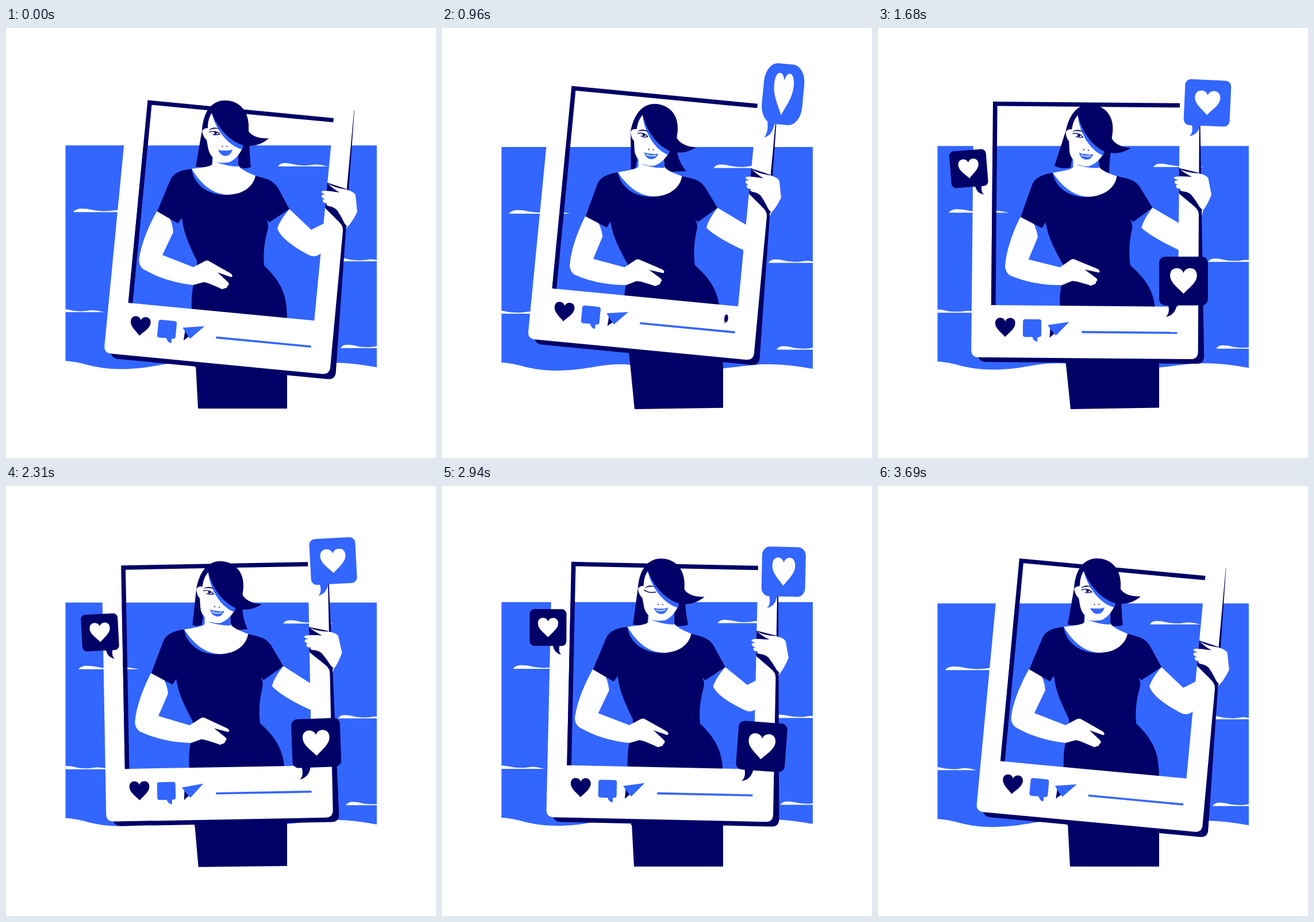
Animation of 748x748 px, one loop 3.72 s. Source, as an HTML page:

```html
<!DOCTYPE html>
<html lang="en">
<head>
<meta charset="utf-8">
<title>Photo frame</title>
<style>
  html, body { margin: 0; width: 100%; height: 100%; overflow: hidden; background: #fff; }
  svg { display: block; width: 100vw; height: 100vh; }
  .n { fill: #006; }
  .b { fill: #36f; }
  .w { fill: #fff; }
  .line { fill: none; stroke: #006; stroke-width: 1.4; stroke-linecap: round; }
</style>
</head>
<body>
<svg viewBox="0 0 748 748">
  <defs>
    <path id="heart" d="M0 21C-8 12-22 3-22-9C-22-18-16-21-11-21C-5-21-1-17 0-13C1-17 5-21 11-21C16-21 22-18 22-9C22 3 8 12 0 21Z"/>
    <path id="ripple" d="M0 0C4-7 14-7 28-3.6C40-1 52-1.2 62-3C72-4.5 80-1 88 0Z"/>
    <path id="tail" d="M4-40V-19Q7-6 0 0Q15-3 18-19V-40Z"/>
    <clipPath id="stage"><rect x="103.500" y="0" width="541.500" height="748"/></clipPath>
  </defs>

  <g clip-path="url(#stage)">
    <g id="sea">
      <path class="b" d="M103 204H646V590C625 587 605 582 565 582C530 582 500 591 450 591S350 582 310 582C270 582 250 593 200 593S135 580 103 579Z"/>
      <g id="ripples" class="w">
        <use href="#ripple" transform="translate(473 240.500)"/>
        <use href="#ripple" transform="translate(117 320) scale(1.200 1.050)"/>
        <use href="#ripple" transform="translate(84 494)"/>
        <use href="#ripple" transform="translate(568 405.500)"/>
        <use href="#ripple" transform="translate(582 556.500)"/>
      </g>
    </g>
  </g>

  <g class="head"><path id="backHair" class="n"/></g>
  <path id="skirt" class="n"/>
  <path id="foreArm" class="w"/>

  <g id="body">
    <path class="w" d="M263 318L281 324Q289 336 291 355L272 395L262 425L240 420Q230 413 232 400C235 375 250 340 263 318Z"/>
    <path class="n" d="M323 245C303 247 291 253 286 264L263 319L299 340L306 330C309 356 317 374 332 405L333 420L326 447Q322 465 323 490L329 590H489V503C488 470 484 447 449 413C447 390 450 370 455 352Q458 342 453 333L458 338L493 315L473 278C464 264 455 263 434 257Z"/>
    <path class="b" d="M323 245C325 268 348 293 388 290L360 250Z"/>
    <path class="w" d="M323 245C345 242 358 241 359 236L361 205H404V238Q406 246 434 257C430 276 412 290 385 290C358 289 338 270 323 245Z"/>
    <path class="b" d="M362 232Q378 237 390 232Q400 225 404 208V241Q385 241 362 232Z"/>
    <path id="lowArm" class="w" d="M272 395L326 416L346 405.500Q350 403.500 354 406L391 427Q396 431 392 433.500L368 425L386 442Q390 446 385 449Q385 453 379 453Q377 456 371 452L352 444L344 442L326 447C290 443 262 433 240 420Q230 413 232 400Z"/>
  </g>

  <g class="frame">
    <path class="n" d="M359.500-17L371 440Q371 453 358 453H-8Q-20 453-22 443V420H340V0Z"/>
    <path class="w" fill-rule="evenodd" d="M-33.500-17H359L360.500 432Q360.500 445 347.500 445H-21Q-34 445-34 432ZM0 0V354H325V0Z"/>
    <path class="n" d="M0 0H325V7.500H7.700V354H0Z"/>
    <use href="#heart" class="n" transform="translate(24.700 392.500) scale(.79)"/>
    <path class="b" d="M60 378H83Q87.500 378 87.500 382V405Q87.500 409 83 409H81V417Q74 416 72 409H60Q55.500 409 55.500 405V382Q55.500 378 60 378Z"/>
    <path class="n" d="M103 393L102 410L111 402Z"/>
    <path class="b" d="M136 382L98.500 388L105 397L113 406Z"/>
    <path class="b" d="M157.800 397.700H324V401.300H157.800Z"/>
    <g transform="rotate(-5.480) translate(-246.500 -125.600)">
      <path class="n" d="M559 269L592 280L593 345L586 352Q587 345 579 337L555 313Z"/>
      <path class="w" d="M560 270.500Q571 278 592 281Q606 285 608 291L611 320Q602 338 594 346L589 340Q584 329 576 317Q570 311 562 310Q555 308 558 305Q550 304 551 299Q553 297 556 298Q548 296 549 291Q553 289 558 290Q548 288 549 284Q556 282 572 285L580 286Q568 279 560 270.500Z"/>
    </g>
  </g>

  <g class="head">
    <path class="w" d="M358 148L350 172Q341 174 341 179Q343 190 349 195L352 211Q354 222 367 231Q378 236 390 233Q405 225 412 207L400 180Z"/>
    <path class="b" d="M358 148C365 180 390 207 411 211L414 200Z"/>
    <path class="n" d="M341 180C342 150 355 126 381 126C405 126 421 143 422 168V179C425 186 438 193 457 192C444 203 430 207 413 204C392 198 370 178 358 148C353 155 351 164 351 174Q343 174 341 180Z"/>
    <path class="n" d="M352 178Q361 169.500 373 176Q362 173.500 352 178Z"/>
    <g id="eyeOpen">
      <path class="line" d="M354 181Q364 177 372 184.500Q365 187 360 185"/>
      <circle class="n" cx="364.500" cy="182.500" r="2.400"/>
    </g>
    <path id="eyeShut" class="line" d="M352 181Q360 187 372 184.500"/>
    <circle class="n" cx="376.500" cy="206" r="1"/>
    <circle class="n" cx="384.500" cy="206" r="1"/>
    <path class="b" d="M369 212Q375 214 381 213Q388 214 394 211Q391 223 381 222.500Q373 222 369 212Z"/>
    <path id="smile" d="M373 215.500Q381 218.500 390 215" fill="none" stroke="#fff" stroke-width="1.400"/>
  </g>

  <g class="frame" id="likes"></g>
</svg>
<script>
const LOOP = 3720, STEP = 30;
const $ = id => document.getElementById(id);
const set = (el, value, name = 'transform') => el.setAttribute(name, value);
const each = (sel, value) => document.querySelectorAll(sel).forEach(el => set(el, value));
const show = (el, on) => set(el, on ? 'inline' : 'none', 'display');

// Smooth periodic curve through one value per pose time
const TIMES = [0, 480, 960, 1680, 2310, 2940];
const curve = values => {
  const n = TIMES.length;
  const time = i => TIMES[(i + n) % n] + Math.floor(i / n) * LOOP;
  const value = i => values[(i + n) % n];
  const slope = i => (value(i + 1) - value(i - 1)) / (time(i + 1) - time(i - 1));
  return t => {
    let i = n - 1;
    while (TIMES[i] > t) i--;
    const h = time(i + 1) - time(i), u = (t - time(i)) / h, v = 1 - u;
    return v * v * ((1 + 2 * u) * value(i) + u * h * slope(i)) +
           u * u * ((3 - 2 * u) * value(i + 1) - v * h * slope(i + 1));
  };
};

const REST = { x: 246.5, y: 125.6, turn: 5.48 };
const frameX = curve([REST.x, 247.3, 225.5, 200, 200.2, 225]);
const frameY = curve([REST.y, 110.5, 100.7, 128, 138.3, 131.8]);
const frameTurn = curve([REST.turn, 6.7, 5.5, 0.5, -1.06, 1.24]);
const sway = curve([0, 0.014, 0.048, 0.054, 0.037, 0.001]);
const nod = curve([0, 0, 7.5, 8, 7, 0.5]);
const swing = curve([0, 10, 20, 0, 12, 3]);

// Like balloons: [time offset, x scale, y scale]
const ENTER = [[0, 0, 0], [100, .75, 1.57], [180, .88, 1.32], [300, 1.06, .92], [400, 1, 1]];
const LEAVE = [[0, 1, 1], [80, .95, 1.08], [190, .7, 1.7], [280, 0, 0]];
const likes = [
  { x: 342, y: 57, size: 1, flip: 1, color: 'b', from: 780, to: 2860,
    turn: curve([0, 0, 0, 2, -2, 0]), drop: curve([0, 0, 0, 0, 2, 16]) },
  { x: 304, y: 375, size: 1.06, flip: 1, color: 'n', from: 940, to: 2950,
    turn: curve([0, 0, 0, -.5, -1, 3]), drop: curve([0, 0, 12, -3, 3, 0]) },
  { x: -14, y: 162, size: .8, flip: -1, color: 'n', from: 1090, to: 3040,
    turn: curve([0, 0, -8, -5, -2, -1]), drop: () => 0 }
];

function add(parent, tag, attrs) {
  const el = document.createElementNS('http://www.w3.org/2000/svg', tag);
  for (const name in attrs) set(el, attrs[name], name);
  return parent.appendChild(el);
}
for (const like of likes) {
  like.group = add($('likes'), 'g', { class: like.color });
  like.box = add(like.group, 'rect', { x: -11, y: -99, width: 80, height: 80 });
  add(like.group, 'use', { href: '#tail' });
  like.heart = add(like.group, 'use', { href: '#heart', class: 'w' });
}

function popScale(keys, t) {
  if (t <= keys[0][0]) return keys[0].slice(1);
  for (let i = 1; i < keys.length; i++) {
    const a = keys[i - 1], b = keys[i];
    if (t < b[0]) {
      const u = (t - a[0]) / (b[0] - a[0]), e = u * u * (3 - 2 * u);
      return [a[1] + (b[1] - a[1]) * e, a[2] + (b[2] - a[2]) * e];
    }
  }
  return keys[keys.length - 1].slice(1);
}

const rotate = (x, y, cx, cy, r) => [
  cx + (x - cx) * Math.cos(r) - (y - cy) * Math.sin(r),
  cy + (x - cx) * Math.sin(r) + (y - cy) * Math.cos(r)
];
const deg = r => r * 180 / Math.PI;

function draw(t) {
  const wave = 2 * Math.PI / LOOP;
  set($('sea'), `translate(0 ${0.4 + 2.5 * Math.sin(wave * (t - 30))})`);
  set($('ripples'), `translate(${3.7 - 5.5 * Math.cos(wave * (t - 480))} 0)`);

  const fx = frameX(t), fy = frameY(t), turn = frameTurn(t);
  each('.frame', `translate(${fx} ${fy}) rotate(${turn})`);

  const lean = sway(t), k = lean / 0.054;
  set($('body'), `rotate(${-deg(lean)} 440 600)`);
  set($('lowArm'), `rotate(${-4 * k} 240 405)`);
  const onBody = (x, y) => rotate(x, y, 440, 600, -lean);
  set($('skirt'), `M${onBody(323, 490)}L${330 - 3 * k} 585L${334 + k} ${662 + k}` +
    `L489 ${662 - 1.5 * k}V590L${onBody(488, 500)}Z`, 'd');

  // The forearm ties the sleeve to the hand on the frame
  const onFrame = (x, y) => {
    const [px, py] = rotate(x, y, REST.x, REST.y, (turn - REST.turn) * Math.PI / 180);
    return [px + fx - REST.x, py + fy - REST.y];
  };
  const bend = 0.3 * (onFrame(549, 285)[1] - 285);
  set($('foreArm'), `M${onBody(493, 315)}L531 ${351 + bend}L553 ${340 + bend}L${onFrame(590, 318)}L${onFrame(594, 346)}` +
    `L549 ${391 + bend}Q538 ${401 + bend} 526 ${394.5 + bend}Q480 ${370 + bend / 2} ${onBody(472, 349)}` +
    `Q${onBody(476, 335)} ${onBody(493, 315)}Z`, 'd');

  each('.head', `translate(${-278 * lean} ${120 * lean}) rotate(${nod(t)} 380 180)`);
  const s = swing(t), rise = s * 0.35;
  set($('backHair'), `M341 178L${330 + s} ${241 + rise / 3}Q${344 + s / 2} 245 358 240L360 180L400 180L404 242` +
    `Q${416 + s / 2} ${246 - rise} ${426 + s} ${242 - rise}Q423 215 423 182L380 140Z`, 'd');

  const shut = (t >= 400 && t < 580) || (t >= 2860 && t < 3040);
  show($('eyeOpen'), !shut);
  show($('eyeShut'), shut);
  show($('smile'), t > 240 && t < 3360);

  for (const like of likes) {
    const [sx, sy] = t < like.to ? popScale(ENTER, t - like.from) : popScale(LEAVE, t - like.to);
    const visible = sx > 0.01;
    show(like.group, visible);
    if (!visible) continue;
    set(like.group, `translate(${like.x} ${like.y + like.drop(t)}) rotate(${like.turn(t)}) ` +
      `scale(${sx * like.size * like.flip} ${sy * like.size})`);
    set(like.heart, `translate(29 -59) scale(${sx} ${sy})`);
    // A stretched balloon gets rounder
    set(like.box, Math.min(38, Math.max(8, 10 + 30 * (sy / sx - 1))), 'rx');
  }
}

const start = performance.now();
function tick() {
  const t = (performance.now() - start) % LOOP;
  draw(Math.floor(t / STEP) * STEP);
  requestAnimationFrame(tick);
}
tick();
</script>
</body>
</html>
```
